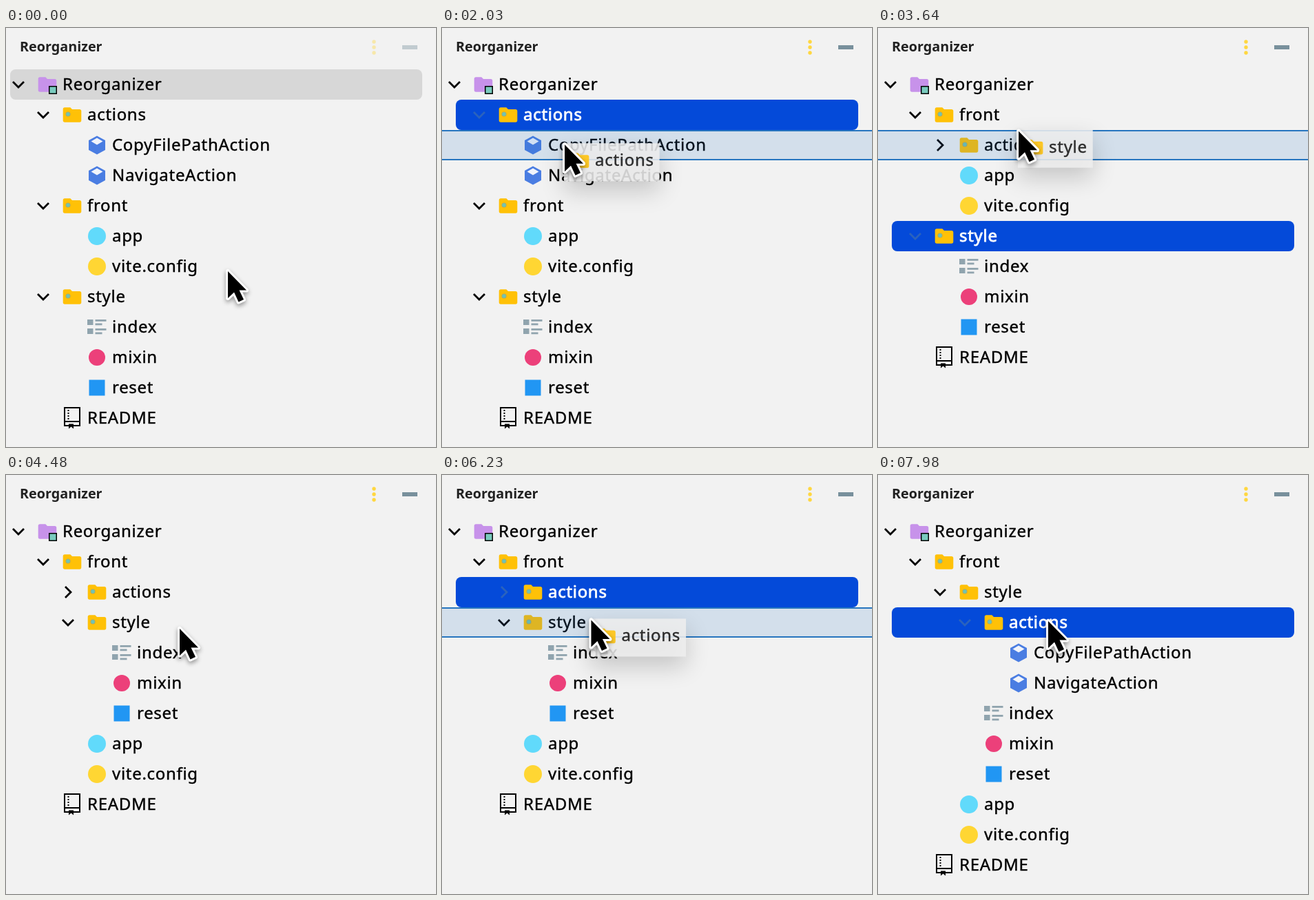
These frames come from a looping animation (624x608 px, 8 s). An HTML page with a canvas:

```html
<!DOCTYPE html>
<html lang="en">
<head>
<meta charset="utf-8">
<title>File tree</title>
<style>
html, body { margin: 0; width: 624px; height: 608px; overflow: hidden; background: #f2f2f2; }
canvas { display: block; }
</style>
</head>
<body>
<canvas id="stage" width="624" height="608"></canvas>
<script>
const ctx = document.getElementById('stage').getContext('2d');
const LOOP = 8000, ROW = 44, TOP = 60, SPACING = 0.7;
const FAMILY = '"Noto Sans", "Open Sans", sans-serif';

// Tree contents
const item = (depth, icon, name, open) => ({ depth, icon, name, open });
const actions = (d, open) => [
  item(d, 'folder', 'actions', open),
  ...(open ? [item(d + 1, 'cube', 'CopyFilePathAction'), item(d + 1, 'cube', 'NavigateAction')] : [])
];
const style = (d, inner = []) => [
  item(d, 'folder', 'style', true), ...inner,
  item(d + 1, 'list', 'index'), item(d + 1, 'pink', 'mixin'), item(d + 1, 'blue', 'reset')
];
const front = (...inner) => [
  item(1, 'folder', 'front', true), ...inner.flat(),
  item(2, 'cyan', 'app'), item(2, 'yellow', 'vite.config')
];
const tree = (...parts) => [
  item(0, 'root', 'Reorganizer', true), ...parts.flat(), item(1, 'book', 'README')
];
const trees = [
  [0, tree(actions(1, true), front(), style(1))],
  [2450, tree(front(), style(1))],
  [2590, tree(front(actions(2, false)), style(1))],
  [3920, tree(front(actions(2, false)))],
  [4060, tree(front(actions(2, false), style(2)))],
  [6650, tree(front(style(2)))],
  [6860, tree(front(style(2, actions(3, false))))],
  [7700, tree(front(style(2, actions(3, true))))]
];

// Selected row: press, drag start, release
const grabs = [
  { name: 'actions', press: 1610, drag: 1750, drop: 2450 },
  { name: 'style', press: 3150, drag: 3290, drop: 3920 },
  { name: 'actions', press: 4970, drag: 5810, drop: 6650 },
  { name: 'actions', press: 7490, drag: LOOP, drop: LOOP }
];

// Pointer keys: time, x, y
const keys = [
  [0, 322, 352], [700, 322, 352], [910, 300, 322], [1050, 300, 322],
  [1470, 150, 130], [1610, 150, 130], [1750, 153, 134], [2030, 178, 168],
  [2380, 180, 262], [2450, 180, 264], [2800, 183, 373], [2870, 183, 373],
  [3120, 168, 306], [3220, 168, 306], [3640, 204, 149], [3850, 212, 128],
  [3920, 212, 128], [4270, 252, 222], [4480, 252, 222], [4690, 246, 178],
  [5740, 246, 178], [6400, 205, 222], [6580, 203, 226], [6720, 197, 287],
  [6850, 195, 294], [7350, 247, 211], [LOOP, 247, 211]
];

// Slope at a key, zero where the motion rests or turns
function slope(i, axis) {
  const a = keys[i - 1], b = keys[i], c = keys[i + 1];
  if (!a || !c || (b[axis] - a[axis]) * (c[axis] - b[axis]) <= 0) return 0;
  return (c[axis] - a[axis]) / (c[0] - a[0]);
}

function pointer(t) {
  const i = keys.findLastIndex(k => k[0] <= t), a = keys[i], b = keys[i + 1];
  const span = b[0] - a[0], u = (t - a[0]) / span, v = 1 - u;
  return [1, 2].map(n =>
    a[n] * v * v * (1 + 2 * u) + b[n] * u * u * (3 - 2 * u) +
    span * u * v * (slope(i, n) * v - slope(i + 1, n) * u));
}

// Drawing helpers
function rect(x, y, w, h, color, r = 0) {
  ctx.fillStyle = color;
  ctx.beginPath();
  ctx.roundRect(x, y, w, h, r);
  ctx.fill();
}
function dot(x, y, r, color) {
  ctx.fillStyle = color;
  ctx.beginPath();
  ctx.arc(x, y, r, 0, 7);
  ctx.fill();
}
function shape(d, color) {
  ctx.fillStyle = color;
  ctx.fill(new Path2D(d));
}
function line(d, color, width) {
  ctx.strokeStyle = color;
  ctx.lineWidth = width;
  ctx.stroke(new Path2D(d));
}
// The thin stroke gives a weight between regular and bold
function text(s, x, y, color, font, spacing, extra) {
  ctx.font = font + ' ' + FAMILY;
  ctx.letterSpacing = spacing + 'px';
  ctx.fillStyle = ctx.strokeStyle = color;
  ctx.lineWidth = extra;
  ctx.fillText(s, x, y);
  if (extra) ctx.strokeText(s, x, y);
}
function at(x, y, draw) {
  ctx.save();
  ctx.translate(x, y);
  draw();
  ctx.restore();
}

const FOLDER = 'M-2.700-10.700H-10.700Q-13.300-10.700-13.300-8V8Q-13.300 10.700-10.700 10.700H10.700Q13.300 10.700 13.300 8V-5.300Q13.300-8 10.700-8H0Z';
const icons = {
  folder() {
    shape(FOLDER, '#ffc107');
    dot(-6, -1, 3.6, '#b4a65c');
    dot(-6, -1, 2.7, '#6fc4b4');
  },
  root() {
    shape(FOLDER, '#c792ea');
    rect(2, 2, 12, 12, '#000');
    rect(3.5, 3.5, 9, 9, '#7accbf');
  },
  cube() {
    shape('M0-13.500L12-7V7L0 13.500L-12 7V-7Z', '#4a7de2');
    shape('M0-10.500L8.500-5.500L0-.5L-8.500-5.500Z', '#f1f4fb');
  },
  list() {
    for (const y of [-11, 2]) {
      rect(-14, y, 8.5, 8, '#90a4ae');
      rect(-2.5, y, 16, 2.8, '#90a4ae');
      rect(-2.5, y + 5.5, 10, 2.8, '#90a4ae');
    }
  },
  book() {
    line('M-11-15H11V11H-11ZM-11 5H11', '#000', 2);
    for (const y of [-11, -7, -3, 1]) rect(-6.5, y - 1, 2, 2, '#000');
    shape('M-5 8.500H2V15.500L-1.500 12.500L-5 15.500Z', '#000');
  },
  cyan: () => dot(0, 0, 13, '#61dafb'),
  yellow: () => dot(0, 0, 13, '#ffd633'),
  pink: () => dot(0, 0, 12, '#ec407a'),
  blue: () => rect(-11.5, -11.5, 23, 23, '#2196f3')
};

function label(row, x, y, color, extra = 0.4) {
  at(x - 22, y, icons[row.icon]);
  text(row.name, x, y + 8, color, '400 24px', SPACING, extra);
}

function drawRow(row, i, selected) {
  const x = 36 * row.depth, y = TOP + ROW * (i + 0.5);
  if (selected) rect(20, y - 22, 584, ROW, '#044ad9', 8);
  if (row.open !== undefined) at(18 + x, y, () =>
    line(row.open ? 'M-8-4L0 4L8-4' : 'M-4-8L4 0L-4 8', selected ? '#2a62bd' : '#000', 2.8));
  label(row, 82 + x, y, selected ? '#fff' : '#000', selected ? 0.8 : 0.4);
}

function drawHeader(t) {
  text('Reorganizer', 20, 34, '#222', '700 19.8px', 0, 0);
  ctx.globalAlpha = Math.min(1, 0.4 + t / 460);
  for (const y of [20, 28, 36]) dot(534, y, 2.7, '#ffd740');
  rect(575, 25, 22, 6, '#78909c');
  ctx.globalAlpha = 1;
}

function drawGhost(row, x, y) {
  ctx.font = '400 24px ' + FAMILY;
  ctx.letterSpacing = SPACING + 'px';
  const width = ctx.measureText(row.name).width + 53;
  ctx.save();
  ctx.globalAlpha = 0.86;
  ctx.shadowColor = 'rgba(0,0,0,.22)';
  ctx.shadowBlur = 34;
  ctx.shadowOffsetY = 14;
  rect(x - 1, y - 1, width, 55, '#efefef');
  ctx.shadowColor = 'transparent';
  label(row, x + 44, y + 24, '#111');
  ctx.restore();
}

function drawPointer(x, y) {
  const arrow = 'M0 1V40L9 31.500L15.500 45.500L23 42L16.500 28.500H27Z';
  at(x, y, () => {
    ctx.lineJoin = 'round';
    ctx.shadowColor = 'rgba(0,0,0,.4)';
    ctx.shadowBlur = 6;
    ctx.shadowOffsetY = 3;
    line(arrow, '#fff', 6);
    ctx.shadowColor = 'transparent';
    shape(arrow, '#000');
  });
}

function draw(t) {
  const rows = trees.findLast(s => s[0] <= t)[1];
  const grab = grabs.find(g => t >= g.press && t < g.drop);
  const [x, y] = pointer(t);
  rect(0, 0, 624, 608, '#f2f2f2');
  drawHeader(t);
  if (t < grabs[0].press) rect(6, TOP, 598, ROW, '#d7d7d7', 8);
  rows.forEach((row, i) => drawRow(row, i, grab && grab.name === row.name));
  if (grab && t >= grab.drag) {
    const over = Math.floor((y - TOP) / ROW);
    if (rows[over].name !== grab.name) {
      const top = TOP + ROW * over;
      rect(0, top, 624, ROW, 'rgba(38,117,191,.15)');
      rect(0, top, 624, 2, '#2675bf');
      rect(0, top + ROW - 2, 624, 2, '#2675bf');
    }
    drawGhost(rows.find(r => r.name === grab.name), x, y);
  }
  drawPointer(x, y);
}

const start = performance.now();
function tick() {
  draw((performance.now() - start) % LOOP);
  requestAnimationFrame(tick);
}
tick();
</script>
</body>
</html>
```
